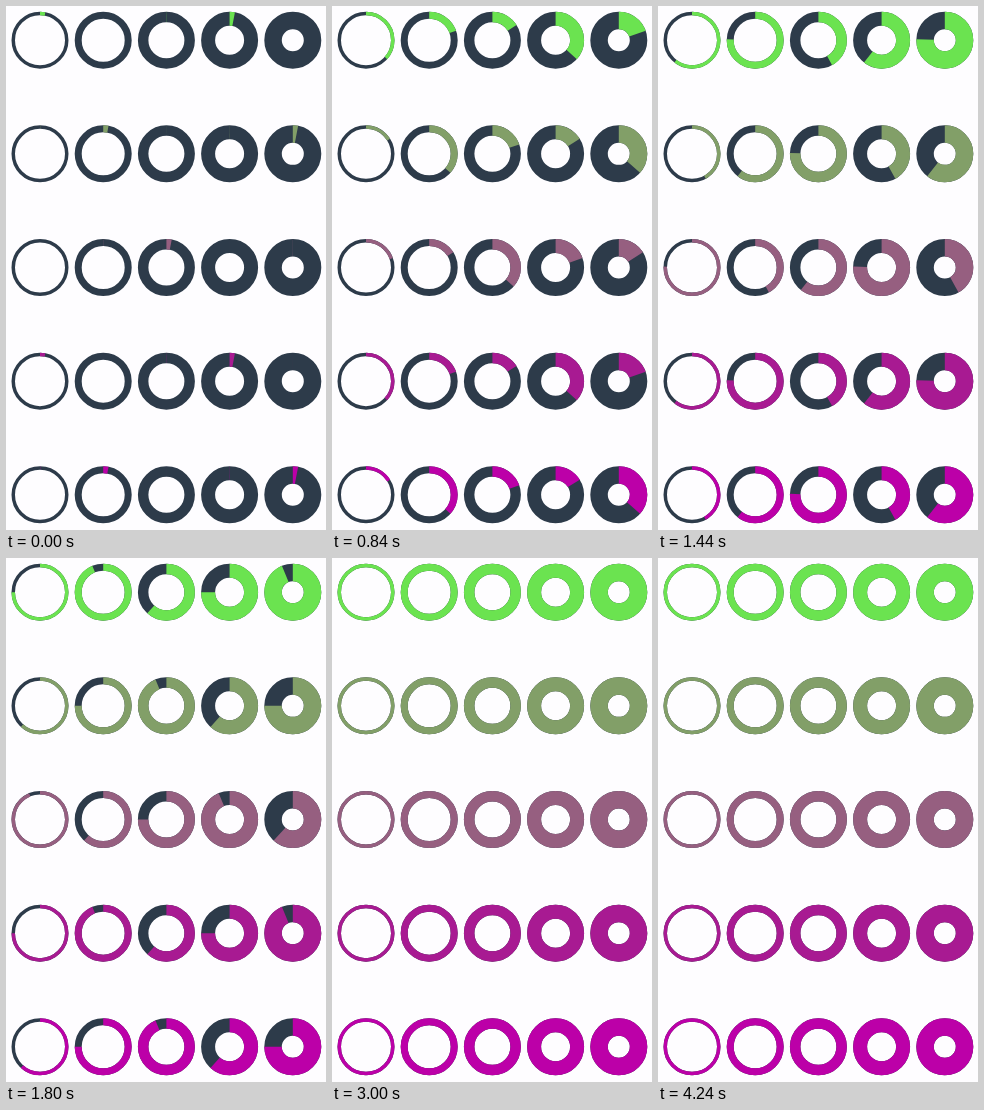
Animation of 320x524 px, one loop 4400 ms. Source, as an HTML page with a canvas:

```html
<!DOCTYPE html>
<html lang="en">
<head>
<meta charset="utf-8">
<title>Ring progress</title>
<style>
html, body { margin: 0; width: 100%; height: 100%; overflow: hidden; background: #fefdff; }
canvas { display: block; width: 320px; height: 524px; }
</style>
</head>
<body>
<canvas id="stage"></canvas>
<script>
const W = 320, H = 524;
const LOOP = 4400, STEP = 40, DURATION = 2500, LEAD = 75;
const RADIUS = 28.5, TRACK = '#2d3b4a';
const COLORS = ['#6be350', '#829f68', '#965f80', '#a81a92', '#bc00a8'];

// linear, ease-in-out cubic, ease-in sine: taken in turn by the rings
const EASINGS = [
  x => x,
  x => x < 0.5 ? 4 * x ** 3 : 1 - (2 - 2 * x) ** 3 / 2,
  x => 1 - Math.cos(x * Math.PI / 2)
];

const canvas = document.getElementById('stage');
const ctx = canvas.getContext('2d');
const dpr = window.devicePixelRatio || 1;
canvas.width = W * dpr;
canvas.height = H * dpr;
ctx.scale(dpr, dpr);

function arc(x, y, width, part, color) {
  const start = -Math.PI / 2;
  ctx.beginPath();
  ctx.arc(x, y, RADIUS - width / 2, start, start + part * 2 * Math.PI);
  ctx.lineWidth = width;
  ctx.strokeStyle = color;
  ctx.stroke();
}

function draw(time) {
  const progress = Math.min(1, (time + LEAD) / DURATION);
  ctx.fillStyle = '#fefdff';
  ctx.fillRect(0, 0, W, H);
  for (let i = 0; i < 25; i++) {
    const col = i % 5, row = Math.floor(i / 5);
    const x = 34 + col * 63.2, y = 34.2 + row * 113.65;
    const width = 3.5 * (col + 1);
    arc(x, y, width, 1, TRACK);
    arc(x, y, width, EASINGS[i % 3](progress), COLORS[row]);
  }
}

const origin = performance.now();
function tick() {
  const time = (performance.now() - origin) % LOOP;
  draw(Math.floor(time / STEP) * STEP);
  requestAnimationFrame(tick);
}
tick();
</script>
</body>
</html>
```
